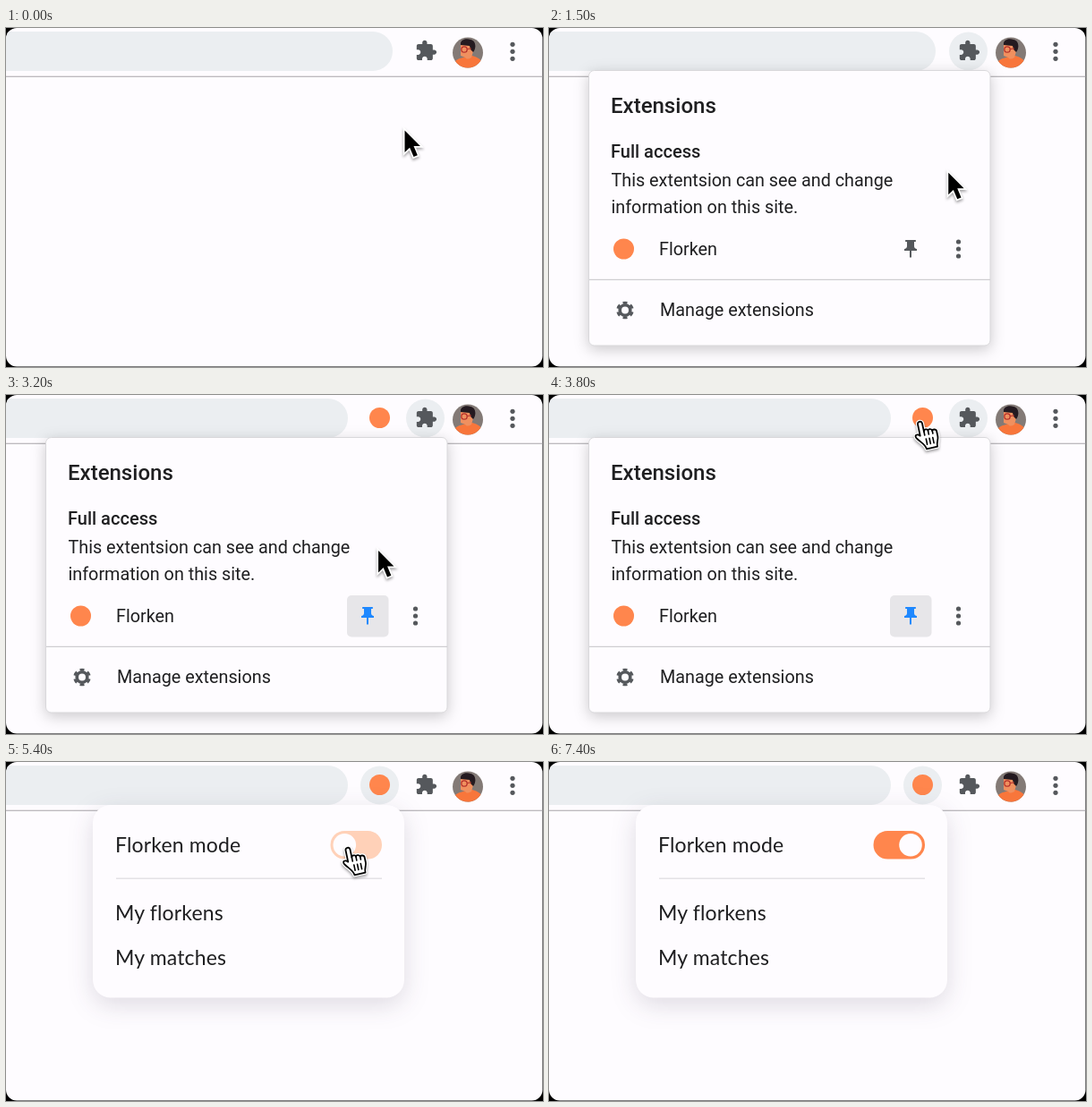
An HTML page for the animation above (7.5 s loop, 600 by 379 pixels).

```html
<!DOCTYPE html>
<html lang="en">
<head>
<meta charset="utf-8">
<title>Pinning an extension</title>
<style>
  html, body { margin: 0; width: 100%; height: 100%; overflow: hidden; background: #000; }
  svg { display: block; width: 100vw; height: 100vh; }
  text { fill: #1f1f21; }
  .menu text { font: 19.8px Roboto, sans-serif; }
  .menu .title { font-size: 24px; font-weight: 500; }
  .menu .strong { font-size: 20px; font-weight: 500; }
  .popup text { font: 23px Lato, sans-serif; letter-spacing: .15px; }
  .icon { fill: #55585c; }
  .brand { fill: #ff864d; }
  .hover { fill: #ebeef1; }
  .page { fill: #fefcff; }
  #menu { filter: drop-shadow(0 4px 8px rgba(0, 0, 0, .2)); }
  #popup { filter: drop-shadow(0 8px 14px rgba(40, 30, 60, .15)); }
  #cursor { filter: drop-shadow(0 2px 1.5px rgba(0, 0, 0, .35)); }
</style>
</head>
<body>
<svg viewBox="0 0 600 379" preserveAspectRatio="none">
  <defs>
    <clipPath id="round"><circle cx="516" cy="27.5" r="17"/></clipPath>
    <clipPath id="window"><rect width="599.5" height="378.5" rx="12"/></clipPath>
    <g id="dots" class="icon">
      <circle cy="-8" r="2.6"/><circle r="2.6"/><circle cy="8" r="2.6"/>
    </g>
  </defs>
  <rect width="600" height="379"/>
  <g clip-path="url(#window)">
    <rect class="page" width="600" height="379"/>
    <rect id="address" class="hover" x="-40" y="4" height="44" rx="22"/>
    <path d="M0 54.3H600" stroke="#a6a5a8" stroke-width="1.1"/>

    <circle id="puzzleHover" class="hover" cx="468.5" cy="26" r="21.5"/>
    <path class="icon" transform="translate(456.7 12.8) scale(1.06)" d="M20.5 11H19V7c0-1.1-.9-2-2-2h-4V3.5C13 2.12 11.88 1 10.5 1S8 2.12 8 3.5V5H4c-1.1 0-2 .9-2 2v3.8h1.5c1.49 0 2.7 1.21 2.7 2.7s-1.21 2.7-2.7 2.7H2V20c0 1.1.9 2 2 2h3.8v-1.5c0-1.49 1.21-2.7 2.7-2.7s2.7 1.21 2.7 2.7V22H17c1.1 0 2-.9 2-2v-4h1.5c1.38 0 2.5-1.12 2.5-2.5S21.88 11 20.5 11z"/>
    <g clip-path="url(#round)">
      <rect x="498" y="10" width="36" height="36" fill="#837a76"/>
      <path d="M498 46C499 36 506 34 511 33L521 31C529 33 533 37 534 46Z" fill="#f8763b"/>
      <path d="M508 18L520 17 522 26 520 33Q515 36 513 33L508 31Z" fill="#f0905f"/>
      <path d="M508 19C507 13 514 11 519 13C525 14 526 22 522 27L519 24 518 20Z" fill="#241a20"/>
      <circle cx="512" cy="24" r="3.2" fill="none" stroke="#b5302a" stroke-width="1.3"/>
      <path d="M515 23.5L520 23" stroke="#b5302a" stroke-width="1.2"/>
    </g>
    <use href="#dots" x="566" y="26.3"/>

    <g id="pinned">
      <circle id="pinnedHover" class="hover" cx="417.5" cy="26" r="21.5"/>
      <circle class="brand" cx="417.5" cy="25.5" r="11.5"/>
    </g>

    <g id="menu" class="menu">
      <rect class="page" x="44.5" y="47.5" width="448.5" height="307.5" rx="6" stroke="#d9d8db"/>
      <text class="title" x="69" y="94.5">Extensions</text>
      <text class="strong" x="69" y="145">Full access</text>
      <text x="69.5" y="177">This extentsion can see and change</text>
      <text x="69.5" y="207">information on this site.</text>
      <circle class="brand" cx="83.5" cy="247" r="11.5"/>
      <text x="123" y="254">Florken</text>
      <rect id="pinHover" x="381" y="224" width="46.5" height="46.5" rx="5" fill="#e7e6e9"/>
      <path id="pin" transform="translate(392 235)" d="M16 9V4h1c.55 0 1-.45 1-1s-.45-1-1-1H7c-.55 0-1 .45-1 1s.45 1 1 1h1v5c0 1.66-1.34 3-3 3v2h5.97v7l1 1 1-1v-7H19v-2c-1.66 0-3-1.34-3-3z"/>
      <use href="#dots" x="457.5" y="247"/>
      <path d="M45 281.3H493" stroke="#cfced1" stroke-width="1.3"/>
      <g transform="translate(85 315.5)" fill="none" stroke="#55585c">
        <circle r="5.8" stroke-width="3.6"/>
        <circle r="8.4" stroke-width="2.8" pathLength="60" stroke-dasharray="5.5 4.5" transform="rotate(-106.5)"/>
      </g>
      <text x="124" y="322">Manage extensions</text>
    </g>

    <g id="popup" class="popup">
      <rect class="page" x="97" y="48" width="348" height="215.5" rx="20"/>
      <text x="122" y="101">Florken mode</text>
      <rect id="track" x="362.5" y="77" width="57.5" height="31.5" rx="15.75"/>
      <circle id="knob" class="page" cy="92.7" r="12.8"/>
      <path d="M123 130.3H420" stroke="#e4e2e6" stroke-width="1.5"/>
      <text x="122" y="177">My florkens</text>
      <text x="122" y="227">My matches</text>
    </g>

    <g id="cursor">
      <path id="arrow" d="M0 0V24.5L5.6 19.2 10 29.6 14.3 27.8 10 17.6H17.4Z" stroke="#fff" stroke-width="3.4" paint-order="stroke"/>
      <g id="hand" transform="rotate(-12) scale(1.06)" stroke-linejoin="round" stroke-linecap="round">
        <path id="palm" fill="#fff" stroke="#fff" stroke-width="4"
          d="M-2.4 2.2C-2.4-.9 2.4-.9 2.4 2.2V11C2.4 8.4 6.8 8.4 6.8 11C7 9 11.2 9.4 11.2 12C11.4 10.2 15.6 10.8 15.6 13.4V19C15.6 23 13 24 13 29.5H1.4C1 24-4 21-6.8 16C-8.6 12.6-5-11.6-2.4 14.6Z"/>
        <path id="outline" fill="#fff" stroke="#000" stroke-width="1.7"/>
        <path d="M2.4 10.5V15M6.8 11V15M11.2 12V15M3 19V25M6.6 19V25M10.2 19V25" fill="none" stroke="#000" stroke-width="1.5"/>
      </g>
    </g>
  </g>
</svg>
<script>
const LOOP = 7500, STEP = 100;
const $ = id => document.getElementById(id);
const set = (id, attrs) => {
  for (const name in attrs) $(id).setAttribute(name, attrs[name]);
};
const mix = (a, b, u) => a + (b - a) * u;
const progress = (t, from, to) => Math.min(1, Math.max(0, (t - from) / (to - from)));
const ease = u => u < .5 ? 4 * u ** 3 : 1 - 4 * (1 - u) ** 3;
const eased = (t, from, to) => ease(progress(t, from, to));

const handShape = "M-2.4 2.2C-2.4-.9 2.4-.9 2.4 2.2V11C2.4 8.4 6.8 8.4 6.8 11C7 9 11.2 9.4 11.2 12" +
  "C11.4 10.2 15.6 10.8 15.6 13.4V19C15.6 23 13 24 13 29.5H1.4C1 24-4 21-6.8 16C-8.6 12.6-5 11.6-2.4 14.6Z";
set("palm", { d: handShape });
set("outline", { d: handShape });

// Each move: start, end, target x, target y, sideways bow
const start = [445.5, 114.5];
const moves = [
  [50, 620, 469, 26, 0],
  [1000, 1910, 417, 240, 11],
  [2750, 3800, 414, 30, 0],
  [4050, 4300, 415.5, 24.5, 0],
  [4500, 5400, 381.5, 96, 0],
  [6250, 7150, 440, -45, 0]
];

function cursorAt(t) {
  let [x, y] = start;
  for (const [from, to, tx, ty, bow] of moves) {
    if (t <= from) break;
    const u = eased(t, from, to);
    x = mix(x, tx, u) + bow * 4 * u * (1 - u);
    y = mix(y, ty, u);
  }
  return [x, y];
}

function isClickable(x, y, menuOpen, popupOpen, pinned) {
  const inCircle = cx => Math.hypot(x - cx, y - 26) < 21.5;
  const inBox = (l, top, r, bottom) => x > l && x < r && y > top && y < bottom;
  return inCircle(468.5) || pinned && !popupOpen && inCircle(417.5) ||
    menuOpen && inBox(381, 224, 428, 271) || popupOpen && inBox(362, 77, 420, 109);
}

const show = (id, opacity) => set(id, { opacity: +opacity });

function draw(t) {
  const [x, y] = cursorAt(t);
  const popup = progress(t, 4000, 4200);
  const menu = progress(t, 750, 900) * (1 - popup);
  const pin = eased(t, 2550, 2800);
  const on = eased(t, 5650, 5950);

  set("address", { width: 40 + mix(432, 382, pin) });
  show("puzzleHover", menu);
  show("pinned", pin);
  show("pinnedHover", popup);
  show("menu", menu);
  show("popup", popup);
  show("pinHover", t >= 1800);
  set("pin", { fill: t >= 2600 ? "#1e88ff" : "#55585c" });
  set("track", { fill: `rgb(255 ${mix(209, 134, on)} ${mix(184, 77, on)})` });
  set("knob", { cx: mix(378.3, 404, on) });

  const hand = isClickable(x, y, menu > 0, popup > 0, pin > 0);
  set("cursor", { transform: `translate(${x} ${y})` });
  show("hand", hand);
  show("arrow", !hand);
}

const origin = performance.now();
function tick() {
  const t = (performance.now() - origin) % LOOP;
  draw(Math.floor(t / STEP) * STEP);
  requestAnimationFrame(tick);
}
tick();
</script>
</body>
</html>
```
